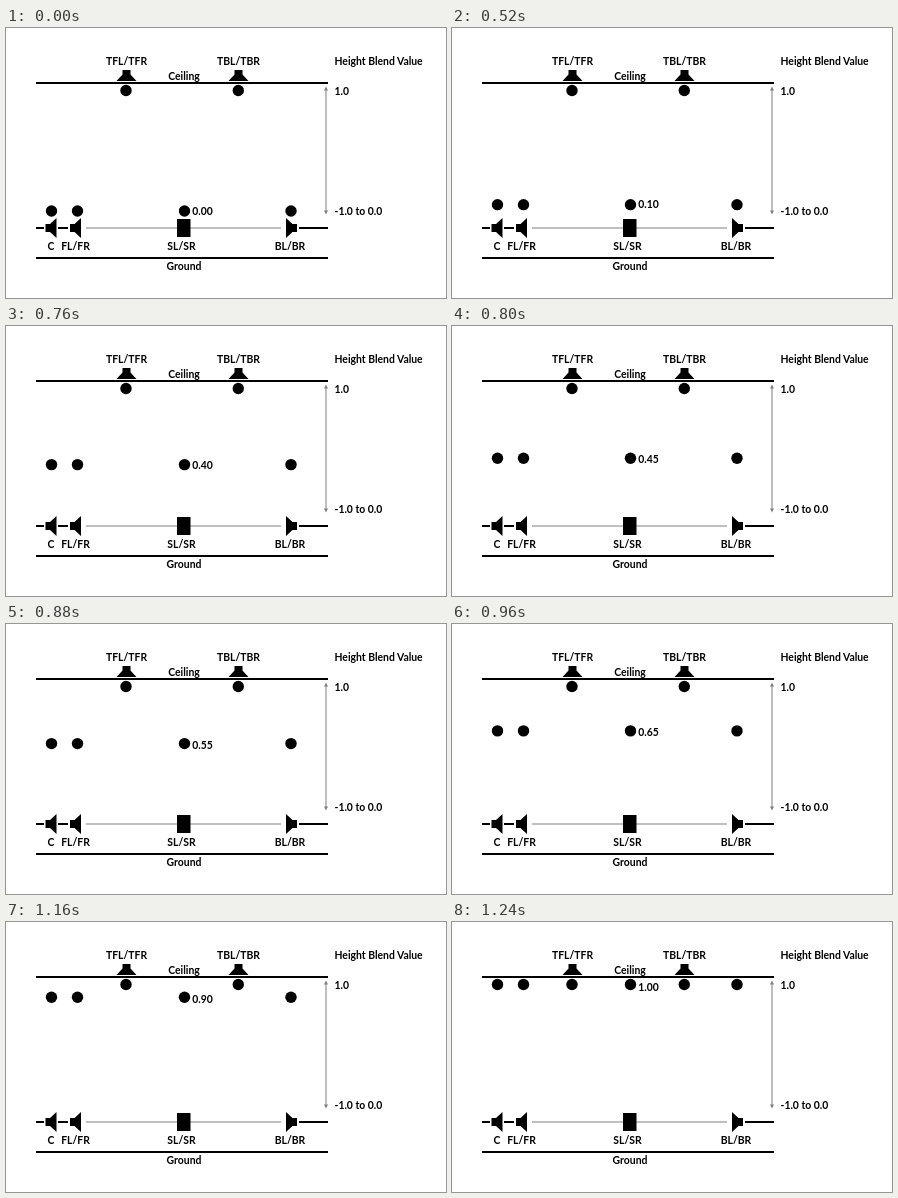
Write an HTML page that moves like this. It is 440 px wide and 270 px high and loops after 2640 ms.

```html
<!DOCTYPE html>
<html lang="en">
<head>
<meta charset="utf-8">
<title>Height blend</title>
<style>
  html, body { margin: 0; width: 100%; height: 100%; overflow: hidden; background: #fff; }
  svg { display: block; width: 440px; height: 270px; }
  text { font: bold 10.4px Lato, "Open Sans", sans-serif; fill: #000; }
  .mid { text-anchor: middle; }
  .rail { stroke: #000; stroke-width: 2; }
</style>
</head>
<body>
<svg viewBox="0 0 440 270">
  <defs>
    <!-- Speaker facing right, centred on its own origin -->
    <path id="speaker" d="M-5.5-4H-1L5.5-10V10L-1 4H-5.5Z"/>
  </defs>

  <path class="rail" d="M30 55H322M30 230H322M30 200H38M52 200H62M293 200H322"/>
  <path d="M80 200H275" stroke="#bfbfbf" stroke-width="2"/>

  <use href="#speaker" x="45" y="200"/>
  <use href="#speaker" x="69.5" y="200"/>
  <use href="#speaker" transform="translate(285.5 200) scale(-1 1)"/>
  <use href="#speaker" transform="translate(120.5 47.5) rotate(90)"/>
  <use href="#speaker" transform="translate(232.5 47.5) rotate(90)"/>
  <rect x="171" y="191" width="13.5" height="18"/>

  <path d="M320 61V184" stroke="#7f7f7f" stroke-width="1"/>
  <path d="M320 58.5L322 62.5H318ZM320 186.5L322 182.5H318Z" fill="#7f7f7f"/>

  <g class="mid">
    <text x="120.5" y="37">TFL/TFR</text>
    <text x="232.5" y="37">TBL/TBR</text>
    <text x="178" y="51.5">Ceiling</text>
    <text x="45" y="221.5">C</text>
    <text x="69.5" y="221.5">FL/FR</text>
    <text x="175.5" y="221.5">SL/SR</text>
    <text x="284" y="221.5">BL/BR</text>
    <text x="178" y="242">Ground</text>
  </g>
  <text x="328.5" y="37">Height Blend Value</text>
  <text x="328.5" y="66.7">1.0</text>
  <text x="328.5" y="186.5">-1.0 to 0.0</text>

  <circle cx="120" cy="62.5" r="5.7"/>
  <circle cx="232.3" cy="62.5" r="5.7"/>
  <g id="dots">
    <circle cx="45.5" r="5.7"/>
    <circle cx="71.5" r="5.7"/>
    <circle cx="178.5" r="5.7"/>
    <circle cx="285" r="5.7"/>
  </g>
  <text id="value" x="186.3"></text>
</svg>
<script>
  const LOOP = 2640, START = 520, TICK = 40, STEPS = 19;
  const dots = document.getElementById("dots");
  const value = document.getElementById("value");
  const mix = (a, b, k) => a + (b - a) * k;

  function draw(ms) {
    const t = ms % LOOP;
    const step = Math.max(0, Math.min(STEPS, Math.floor((t - START) / TICK) + 1));
    const k = step / STEPS;
    dots.setAttribute("transform", `translate(0 ${mix(183, 62.5, k)})`);
    value.setAttribute("y", mix(186.7, 68.7, k));
    // The first step counts double: 0.00, 0.10, 0.15 ... 1.00
    value.textContent = (step ? (step + 1) * 0.05 : 0).toFixed(2);
  }

  const origin = performance.now();
  function tick() {
    draw(performance.now() - origin);
    requestAnimationFrame(tick);
  }
  tick();
</script>
</body>
</html>
```
